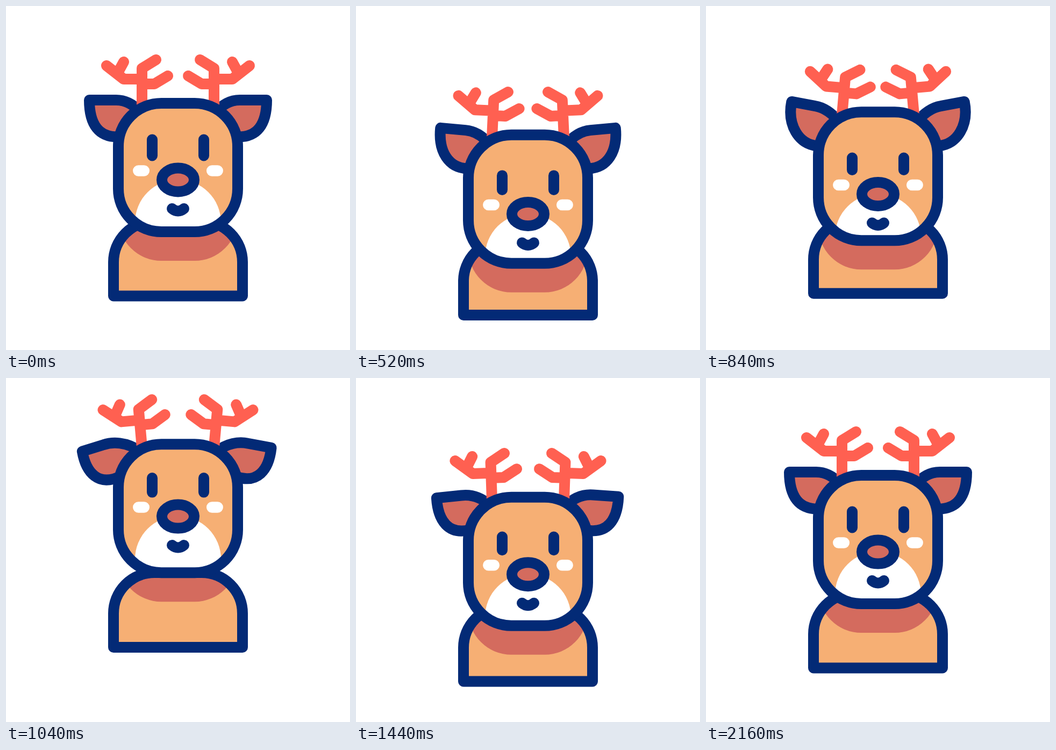
An HTML page that plays this animation: 640x640 px, repeating every 2.4 s.

```html
<!DOCTYPE html>
<html lang="en">
<head>
<meta charset="utf-8">
<title>Bouncing reindeer</title>
<style>
  html, body { margin: 0; width: 100%; height: 100%; overflow: hidden; background: #fff; }
  svg { display: block; width: 100vw; height: 100vh; }
  .line { stroke: #032a76; stroke-width: 20; stroke-linecap: round; stroke-linejoin: round; }
  .antler { fill: none; stroke: #ff6051; stroke-width: 20; stroke-linecap: round; stroke-linejoin: round; }
  .cheek { stroke: #fff; stroke-width: 20.5; stroke-linecap: round; }
  .fur { fill: #f6af74; }
  .rose { fill: #d46b5e; }
  .hollow { fill: none; }
</style>
</head>
<body>
<svg viewBox="0 0 640 640">
  <defs>
    <path id="torso" d="M200 539.5V476.5A76 76 0 0 1 276 400.5H364A76 76 0 0 1 440 476.5V539.5Z"/>
    <rect id="skull" x="209" y="181" width="222" height="239" rx="80"/>
    <g id="horn">
      <path d="M253 194V116L279 100M253 145H276L301 130M253 136H219L187 111M207 126L219 104"/>
    </g>
    <clipPath id="torsoClip"><use href="#torso"/></clipPath>
    <clipPath id="skullClip"><use href="#skull"/></clipPath>
  </defs>

  <g id="body">
    <use href="#torso" class="fur"/>
    <g clip-path="url(#torsoClip)"><use id="shadow" href="#skull" class="rose"/></g>
    <use href="#torso" class="line hollow"/>
  </g>

  <g id="head">
    <path id="earLeft" class="line rose"/>
    <path id="earRight" class="line rose" transform="matrix(-1 0 0 1 640 0)"/>
    <g class="antler">
      <use id="hornLeft" href="#horn"/>
      <g transform="matrix(-1 0 0 1 640 0)"><use id="hornRight" href="#horn"/></g>
    </g>
    <use href="#skull" class="fur"/>
    <g clip-path="url(#skullClip)"><circle id="muzzle" cx="320" cy="403" r="80" fill="#fff"/></g>
    <use href="#skull" class="line hollow"/>
    <g id="face">
      <path class="cheek" d="M246.3 306.5H256.8M383.2 306.5H393.7"/>
      <path id="eyes" class="line"/>
      <ellipse class="line rose" cx="320" cy="323.5" rx="30" ry="22"/>
      <path class="line hollow" d="M309 377Q320 386 331 377"/>
    </g>
  </g>
</svg>
<script>
const LOOP = 2400, STEP = 40;
const $ = id => document.getElementById(id);
const smooth = x => x * x * (3 - 2 * x);

// Value over time from [ms, value] keys, eased between neighbours.
const track = (...keys) => t => {
  if (t <= keys[0][0]) return keys[0][1];
  for (let i = 1; i < keys.length; i++) {
    const [t0, v0] = keys[i - 1], [t1, v1] = keys[i];
    if (t < t1) return v0 + (v1 - v0) * smooth((t - t0) / (t1 - t0));
  }
  return keys[keys.length - 1][1];
};

const bodyY  = track([200, 0], [600, 39.5], [1040, -38.5], [1480, 26.5], [1920, 0]);
const headY  = track([240, 0], [640, 75], [1080, -61], [1520, 50.5], [1960, 0]);
const faceY  = track([330, 0], [780, 12], [1150, -13.5], [1682, 12], [2170, 0]);
const squint = track([300, 0], [780, 8], [1170, 1.8], [1660, 8], [2170, 0]);
const sway   = track([320, 0], [768, 1.07], [1190, -1.67], [1700, 1.07], [2170, 0]);

// Ear outline: root, two handles, bend, tip, two handles, lower root.
const ear = {
  rest: [252, 200, 238, 183, 222, 175, 205, 175, 155, 175, 155, 222, 174, 243.5, 207, 243.5],
  up:   [250, 202, 236, 185, 219, 172, 203, 169, 160, 159.5, 150, 202, 172, 241, 207, 244],
  down: [252, 195, 222, 174, 193, 177, 178, 183, 140, 197, 148, 236, 172, 263, 214, 240]
};

function earPath(amount) {
  const pose = amount > 0 ? ear.up : ear.down, k = Math.abs(amount);
  const p = ear.rest.map((v, i) => (v + (pose[i] - v) * k).toFixed(2));
  return `M${p.slice(0, 2)}C${p.slice(2, 8)}L${p.slice(8, 10)}C${p.slice(10)}`;
}

const shift = (id, y) => $(id).setAttribute("transform", `translate(0 ${y.toFixed(2)})`);

function draw(t) {
  const body = bodyY(t), head = headY(t), face = faceY(t), swing = sway(t);
  shift("body", body);
  shift("head", head);
  shift("shadow", head - body + 54);
  shift("face", face);
  shift("muzzle", face);

  const top = 248.5 + squint(t);
  $("eyes").setAttribute("d", `M272 ${top}V278.5M368 ${top}V278.5`);

  $("earLeft").setAttribute("d", earPath(swing));
  $("earRight").setAttribute("d", earPath(swing < 0 ? swing * 0.65 : swing));
  for (const id of ["hornLeft", "hornRight"]) {
    $(id).setAttribute("transform", `rotate(${5.8 * swing} 253 187)`);
  }
}

function tick() {
  const t = performance.now() % LOOP;
  draw(Math.floor(t / STEP) * STEP);
  requestAnimationFrame(tick);
}
tick();
</script>
</body>
</html>
```
